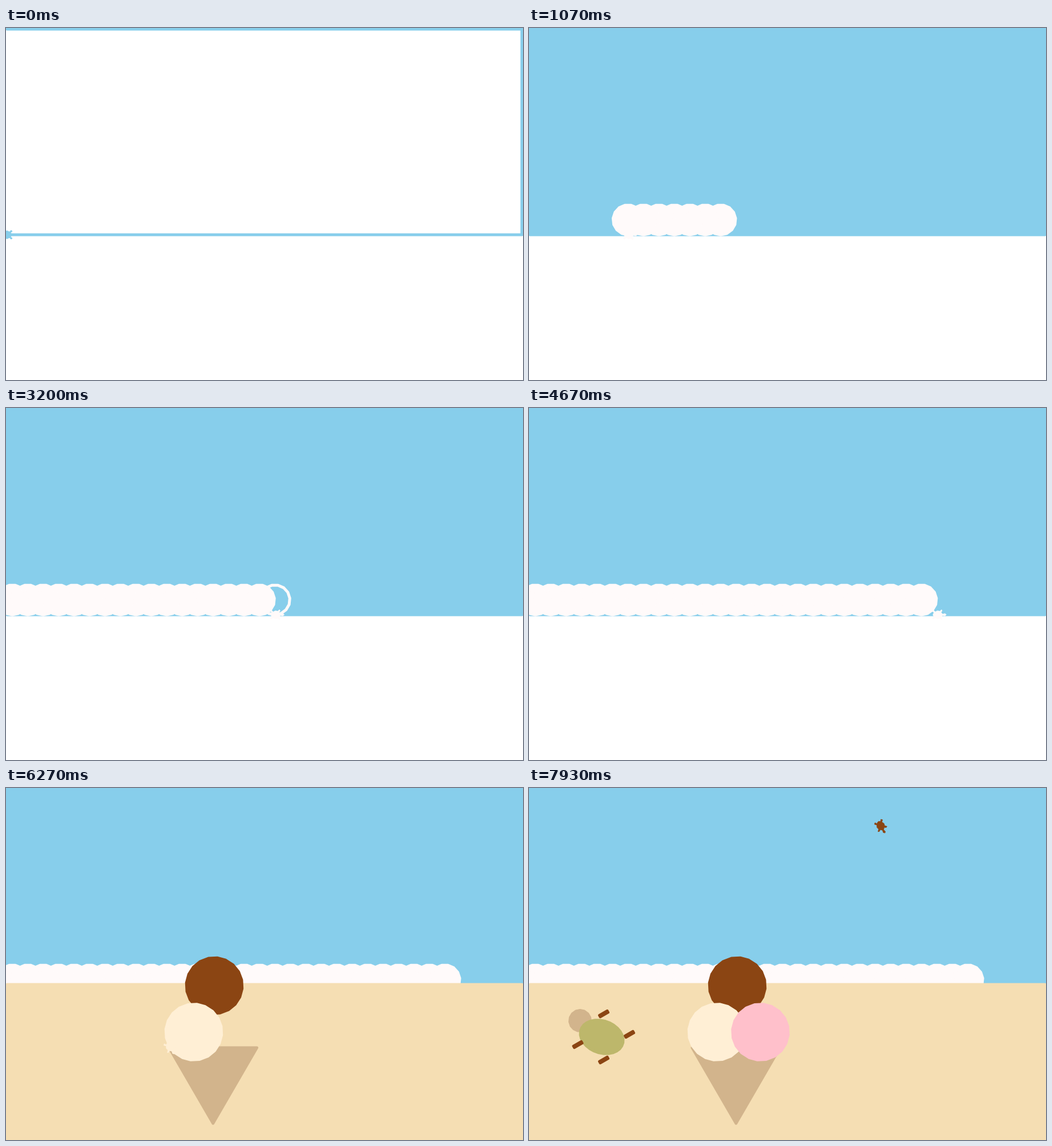
An HTML page with a canvas that plays this animation: 906x618 px, repeating every 8 s.

```html
<!DOCTYPE html>
<html lang="en">
<head>
<meta charset="utf-8">
<title>Turtle beach</title>
<style>
html, body { margin: 0; width: 100%; height: 100%; overflow: hidden; background: #fff; }
canvas { display: block; }
</style>
</head>
<body>
<canvas id="stage" width="906" height="618"></canvas>
<script>
const ctx = document.getElementById('stage').getContext('2d');
const LOOP = 8000, STEP = 200 / 3, RAD = Math.PI / 180;
const SKY = '#87ceeb', SNOW = '#fffafa', SAND = '#f5deb3', TAN = '#d2b48c',
      BROWN = '#8b4513', CREAM = '#ffefd5', PINK = '#ffc0cb', KHAKI = '#bdb76b';

// Right half of the turtle cursor: [sideways, forward]
const HALF = [[0, 16], [2, 14], [1, 10], [4, 7], [7, 9], [9, 8], [6, 5], [7, 1],
              [5, -3], [8, -6], [6, -8], [4, -5], [0, -7]];
const CURSOR = [...HALF, ...HALF.slice(1, -1).reverse().map(([s, f]) => [-s, f])];

const clamp = v => Math.max(0, Math.min(1, v));
const polar = (x, y, r, deg) => [x + r * Math.cos(deg * RAD), y - r * Math.sin(deg * RAD)];

const shapes = [];

// pts is a closed outline; rest is the heading before and after drawing
function add(t0, t1, color, pts, rest) {
  const path = [...pts, pts[0]];
  const lens = pts.map((p, i) => Math.hypot(path[i + 1][0] - p[0], path[i + 1][1] - p[1]));
  shapes.push({ t0, t1, color, path, lens, rest, total: lens.reduce((a, b) => a + b) });
}

function addRect(t0, t1, color, x0, y0, x1, y1) {
  add(t0, t1, color, [[x0, y0], [x1, y0], [x1, y1], [x0, y1]]);
}

// Regular polygon drawn counterclockwise, setting off with the given heading
function addCircle(t0, t1, color, x, y, r, sides, heading) {
  const pts = Array.from({ length: sides },
    (_, i) => polar(x, y, r, heading - 90 + i * 360 / sides));
  add(t0, t1, color, pts, heading);
}

function addLeg(t0, t1, x, y) {
  const corner = (u, v) => {
    const [px, py] = polar(x, y, u, 30);
    return polar(px, py, v, -60);
  };
  add(t0, t1, BROWN, [corner(-7.75, -1.5), corner(-7.75, 1.5), corner(7.75, 1.5), corner(7.75, -1.5)], -60);
}

// A row of wave circles; keys are [index, start time]
function addWaves(x, dx, keys) {
  for (let j = 0; j < keys.length - 1; j++) {
    const [a, ta] = keys[j], [b, tb] = keys[j + 1], span = (tb - ta) / (b - a);
    for (let i = a; i < b; i++) {
      const t = ta + (i - a) * span;
      addCircle(t, t + span, SNOW, x + i * dx, 336.8, 26.2, 15, 0);
    }
  }
}

addRect(-419.8, 180.2, SKY, 2, 2, 904, 363);
addWaves(335.9, -27.07, [[0, 200], [5, 865], [7, 1072], [11, 1725], [12, 1925], [13, 2110], [16, 2540]]);
addWaves(362.97, 27.07, [[0, 2540], [5, 3225], [6, 3420], [10, 4185], [13, 4655], [16, 5110]]);
addRect(5150, 5710, SAND, 2, 345, 904, 616);
add(5690, 5926, TAN, [[286, 456], [362.8, 588.8], [439.6, 456]]);
addCircle(5926, 6100, BROWN, 365, 347, 49, 20, -60);
addCircle(6100, 6270, CREAM, 329, 428.5, 49, 20, -60);
addCircle(6270, 6440, PINK, 405.5, 428.5, 49, 20, -60);
addCircle(6450, 6610, TAN, 89.5, 408.5, 18, 15, -60);

const body = Array.from({ length: 28 }, (_, i) => {
  const a = (200 + i * 360 / 28) * RAD;
  const [x, y] = polar(127.5, 437, 38.6 * Math.cos(a), -20);
  return polar(x, y, 28.1 * Math.sin(a), 70);
});
add(6610, 6810, KHAKI, body, -60);

[[85.5, 450.5], [131, 477.5], [176, 432.5], [131, 396.5]].forEach(([x, y], i) =>
  addLeg(6900 + i * 205, 7105 + i * 205, x, y));

function drawCursor([x, y], heading, color) {
  ctx.beginPath();
  for (const [s, f] of CURSOR) {
    const [px, py] = polar(x, y, f, heading);
    ctx.lineTo(...polar(px, py, s, heading - 90));
  }
  ctx.closePath();
  ctx.fillStyle = ctx.strokeStyle = color;
  ctx.lineWidth = 1;
  ctx.fill();
  ctx.stroke();
}

// Draws one shape as far as it has got and returns the pen's place and heading
function drawShape(s, t) {
  const span = s.t1 - s.t0;
  const p = clamp((t - s.t0 - 0.1 * span) / (0.7 * span));
  let left = p * s.total, at = s.path[0], dir = 0;
  ctx.beginPath();
  ctx.moveTo(...at);
  for (let i = 0; i < s.lens.length; i++) {
    const [x0, y0] = s.path[i], [x1, y1] = s.path[i + 1];
    const k = clamp(left / s.lens[i]);
    at = [x0 + (x1 - x0) * k, y0 + (y1 - y0) * k];
    dir = Math.atan2(y0 - y1, x1 - x0) / RAD;
    if (k > 0) ctx.lineTo(...at);
    left -= s.lens[i];
    if (left <= 0) break;
  }
  ctx.strokeStyle = ctx.fillStyle = s.color;
  ctx.lineWidth = 5;
  ctx.lineCap = ctx.lineJoin = 'round';
  if (t >= s.t0 + 0.92 * span) {
    ctx.closePath();
    ctx.fill();
  }
  if (p > 0) ctx.stroke();
  if (s.rest !== undefined && (p === 0 || p === 1)) dir = s.rest;
  return { at, dir, color: s.color };
}

function render(t) {
  ctx.fillStyle = '#fff';
  ctx.fillRect(0, 0, 906, 618);
  let pen;
  for (const s of shapes) if (t >= s.t0) pen = drawShape(s, t);
  const fly = clamp((t - 7740) / 180);
  const [x, y] = pen.at;
  drawCursor([x + (615.5 - x) * fly, y + (65 - y) * fly], pen.dir, pen.color);
}

const begin = performance.now();
function tick(now) {
  const t = Math.max(0, now - begin) % LOOP;
  // The picture advances fifteen times a second
  render(Math.floor((t + 4) / STEP) * STEP % LOOP);
  requestAnimationFrame(tick);
}
render(0);
requestAnimationFrame(tick);
</script>
</body>
</html>
```
